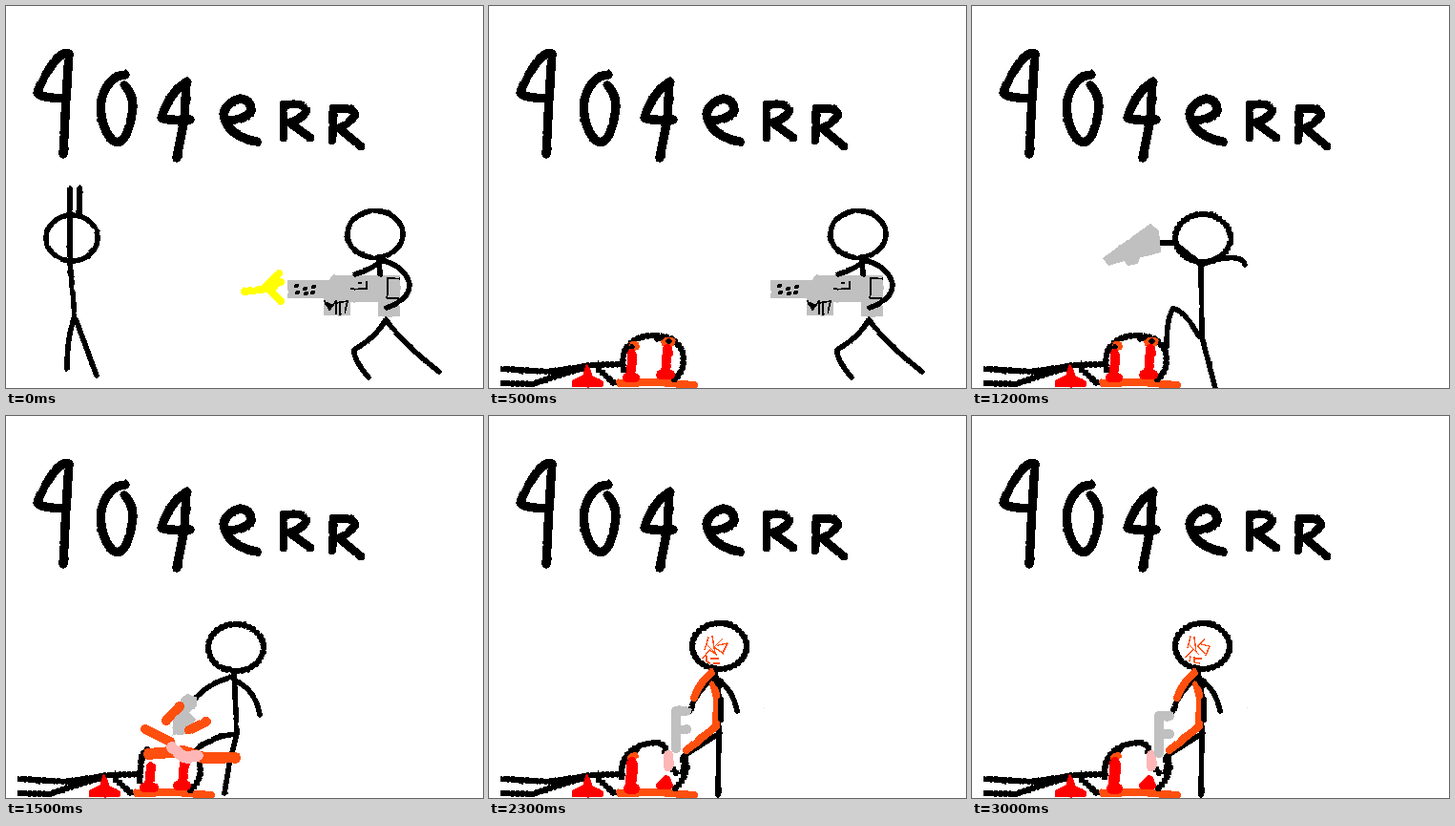
Recreate the animation shown at these times as an HTML page. Size 500 by 400 pixels, loop 3100 ms.

```html
<!DOCTYPE html>
<html lang="en">
<head>
<meta charset="utf-8">
<title>404 err</title>
<style>
  html, body { margin: 0; width: 100%; height: 100%; overflow: hidden; background: #fff; }
  svg { display: block; width: 500px; height: 400px; }
  path, ellipse { fill: none; stroke: #000; stroke-width: 5.6; stroke-linecap: round; stroke-linejoin: round; shape-rendering: crispEdges; }
  .title { stroke-width: 9.4; }
  .small { stroke-width: 8.8; }
  /* overlapping round dabs, like a shaky brush */
  .dabs { stroke-width: 6.8; stroke-dasharray: 0 5; }
  .fine { stroke-width: 1.8; }
  .gun { fill: #c0c0c0; stroke: none; }
  .barrel { stroke: #c0c0c0; stroke-width: 10; }
  .red { stroke: #f00; }
  .pool { fill: #f00; stroke: #f00; }
  .orange { stroke: #ff4f0f; }
  .pink { stroke: #ffb6b6; }
  .yellow { stroke: #ff0; }
  .scribble { stroke: #ff4f0f; stroke-width: 1.4; }
  .w4 { stroke-width: 4; }
  .w8 { stroke-width: 8; }
  .w10 { stroke-width: 10; }
  .w12 { stroke-width: 12; }
  [data-at] { visibility: hidden; }
  [data-at].on { visibility: visible; }
</style>
</head>
<body>
<svg viewBox="0 0 500 400">
  <filter id="rough" filterUnits="userSpaceOnUse" x="0" y="0" width="500" height="400" color-interpolation-filters="sRGB">
    <feTurbulence type="fractalNoise" baseFrequency=".1" numOctaves="1" seed="4"/>
    <feDisplacementMap in="SourceGraphic" scale="2.5" xChannelSelector="R" yChannelSelector="G"/>
  </filter>

  <g filter="url(#rough)">
    <path class="title" d="M66 50Q56 48 46 65Q35 82 33 91Q35 96 62 97M66 50L63 95L60 155"/>
    <path class="title" d="M125 72Q107 73 100 98Q97 125 112 141Q124 148 130 122Q138 97 124 83"/>
    <path class="title" d="M190 79Q171 91 163 117Q164 120 193 119M189 80L187 118L179 159"/>
    <path class="title" d="M231 120Q250 120 257 110Q257 98 245 97Q231 101 228 113Q231 136 263 142"/>
    <path class="small" d="M291 103L291 138M291 104Q312 100 315 109Q312 118 297 122L319 138"/>
    <path class="small" d="M343 107L342 141M343 108Q364 105 366 114Q361 122 349 128L372 147"/>

    <!-- victim upright -->
    <g data-at="0-3" id="victim">
      <path d="M67 191V268L72 325M77 190V218M72 325Q64 345 64 380M72 325Q82 352 95 387"/>
      <ellipse cx="69" cy="243" rx="27" ry="24"/>
    </g>

    <!-- victim on the floor -->
    <g data-at="4-30">
      <path class="dabs" d="M15 380L62 383L108 376L140 375M15 395L45 396Q75 386 105 377M115 381Q125 388 133 398"/>
      <path class="w8 orange" d="M137 395L178 394L215 397"/>
      <path class="w4 pool" d="M103 377L100 388L89 393V397H118V394L107 389Z"/>
    </g>
    <g data-at="4-13">
      <path class="dabs" d="M141 381C136 351 158 344 178 345C202 348 206 366 203 378Q200 388 191 393"/>
      <path class="w10 orange" d="M151 356H153M185 352H190"/>
      <path d="M149 357H150M188 351H189M176 349L181 347"/>
      <path class="w10 red" d="M150 364L149 388M145 389H153M187 359L185 386M180 386H190"/>
    </g>
    <g data-at="14-17">
      <path class="dabs" d="M140 382L142 357Q145 349 152 348M203 365Q207 380 192 393"/>
      <path class="w10 red" d="M152 367L150 388M145 389H155M187 363L185 386M180 387H189"/>
    </g>
    <g data-at="18-30">
      <path class="dabs" d="M139 378C137 353 155 342 178 342Q189 347 183 354M203 360L208 366Q205 382 194 391M193 370L199 377"/>
      <path class="w8" d="M146 355L154 349"/>
      <path class="w8 orange" d="M148 358L153 356"/>
      <path class="w12 red" d="M150 363L149 388M147 390H152"/>
      <path class="w8 pool" d="M186 380L179 387H189Z"/>
      <path class="w10 pink" d="M188 355V367"/>
    </g>

    <!-- aiming -->
    <g data-at="0-8" id="shooter">
      <ellipse cx="387" cy="239" rx="29" ry="24.5"/>
      <path class="gun" d="M295 287H339L342 282H413V325H390V310H361V324H333V306H295Z"/>
      <path d="M391 265L392 281M395 266Q385 275 366 281M393 266Q418 272 423 291Q423 308 399 316"/>
      <path d="M398 328Q390 345 365 360Q364 370 380 389M398 328Q414 352 454 383"/>
      <path class="fine" d="M412 285H400V306H411M362 296H378V289M370 290H372M334 309L339 318L346 309V322M346 311L358 309L355 321M350 310V322"/>
      <path class="w4" d="M304 293h1M313 296h1M322 294h1M305 300h1M314 301h1M321 300h1M336 312L341 314"/>
    </g>
    <path data-at="0-2" id="flash" class="w8 yellow" d="M250 299L281 295M270 296L286 280M277 298L288 309M278 292L288 289"/>

    <!-- gun raised -->
    <g data-at="9-12">
      <ellipse class="dabs" cx="242" cy="243" rx="29" ry="25"/>
      <path d="M197 248H212L240 271Q262 262 277 264Q286 266 286 271M240 271L241 347L255 400M238 346Q222 318 211 317Q204 325 204 358"/>
      <path class="gun" d="M137 264L163 245L187 228L196 235L198 258L183 262L176 263L174 270L163 272L160 267L143 272Z"/>
    </g>

    <!-- strike -->
    <g data-at="13-17">
      <ellipse class="dabs" cx="241" cy="242.5" rx="29" ry="24.5"/>
      <path d="M239 268L242 333L234 365L229 395M239 273Q211 279 197 298M242 278Q262 288 266 313M242 333Q215 335 198 351"/>
      <path id="club" class="gun" d="M183 296L190 291L200 294V304L192 310L199 318L190 333L174 335L175 317L184 308Z"/>
    </g>
    <g data-at="14-17">
      <path class="w10 orange" d="M182 304L168 319M146 328L172 341M192 329L210 320"/>
      <path class="w12 orange" d="M149 354L185 351L208 358L240 358"/>
      <path class="w12 pink" d="M174 347L186 357L201 356"/>
    </g>

    <!-- aftermath -->
    <g data-at="18-30">
      <ellipse class="dabs" cx="241.5" cy="241" rx="28.5" ry="24"/>
      <path d="M237 268L242 300L241 335L240 397M236 274Q217 288 210 310M240 276Q256 287 260 309M242 332L204 356"/>
      <path class="dabs" d="M206 358L202 377"/>
      <path class="w8 orange" d="M233 269Q220 280 215 295M235 281L239 295L238 325L207 350"/>
      <path d="M236 275L242 283M243 296V318"/>
      <path class="gun" data-at="18-21" d="M194 306L213 308L215 318L204 318L203 326L215 328L214 341L202 342L201 354L192 353Z"/>
      <path class="barrel" data-at="22-30" id="barrel" d="M196 348V309H207M199 328H207"/>
    </g>
    <path data-at="18-21" class="w8 red" d="M222 254L235 244"/>
  </g>

  <path data-at="22-30" id="face" class="scribble"/>
  <path data-at="22-30" class="fine" style="stroke:#ddd;stroke-width:1" d="M288 305h1"/>
</svg>
<script>
  const STEP = 100, LOOP = 3100;
  const $ = id => document.getElementById(id);
  const parts = [...document.querySelectorAll('[data-at]')].map(el => {
    const [from, to] = el.dataset.at.split('-').map(Number);
    return { el, from, to };
  });
  const faces = [
    'M230 232L226 245M234 231L237 248L228 239M245 233L236 242L246 249M224 254L231 245L239 250M240 240L250 238L245 248M228 252V257L232 259M233 254H240M236 259H241',
    'M229 231L226 243M233 232L235 247L228 240M244 234L236 241L245 249M224 253L232 244L238 250M240 239L249 241L245 251M229 252L228 257M233 253V258L239 259M235 254H240'
  ];
  const walk = [-36, -74, -111];
  const move = (id, transform) => $(id).setAttribute('transform', transform);
  let last = -1;

  function draw(step) {
    for (const { el, from, to } of parts) el.classList.toggle('on', step >= from && step <= to);
    const odd = step % 2;
    move('flash', `translate(${-75 * step} 0)`);
    move('victim', step === 3 ? 'translate(-25 0) rotate(45 70 385)' : '');
    move('shooter', `translate(${walk[step - 6] || 0} 0)`);
    move('club', step === 13 ? 'rotate(50 197 298)' : '');
    move('barrel', `translate(0 ${odd ? 0 : 5})`);
    $('face').setAttribute('d', faces[odd ? 0 : 1]);
  }

  function tick() {
    const step = Math.floor(performance.now() % LOOP / STEP);
    if (step !== last) draw(last = step);
    requestAnimationFrame(tick);
  }
  tick();
</script>
</body>
</html>
```
